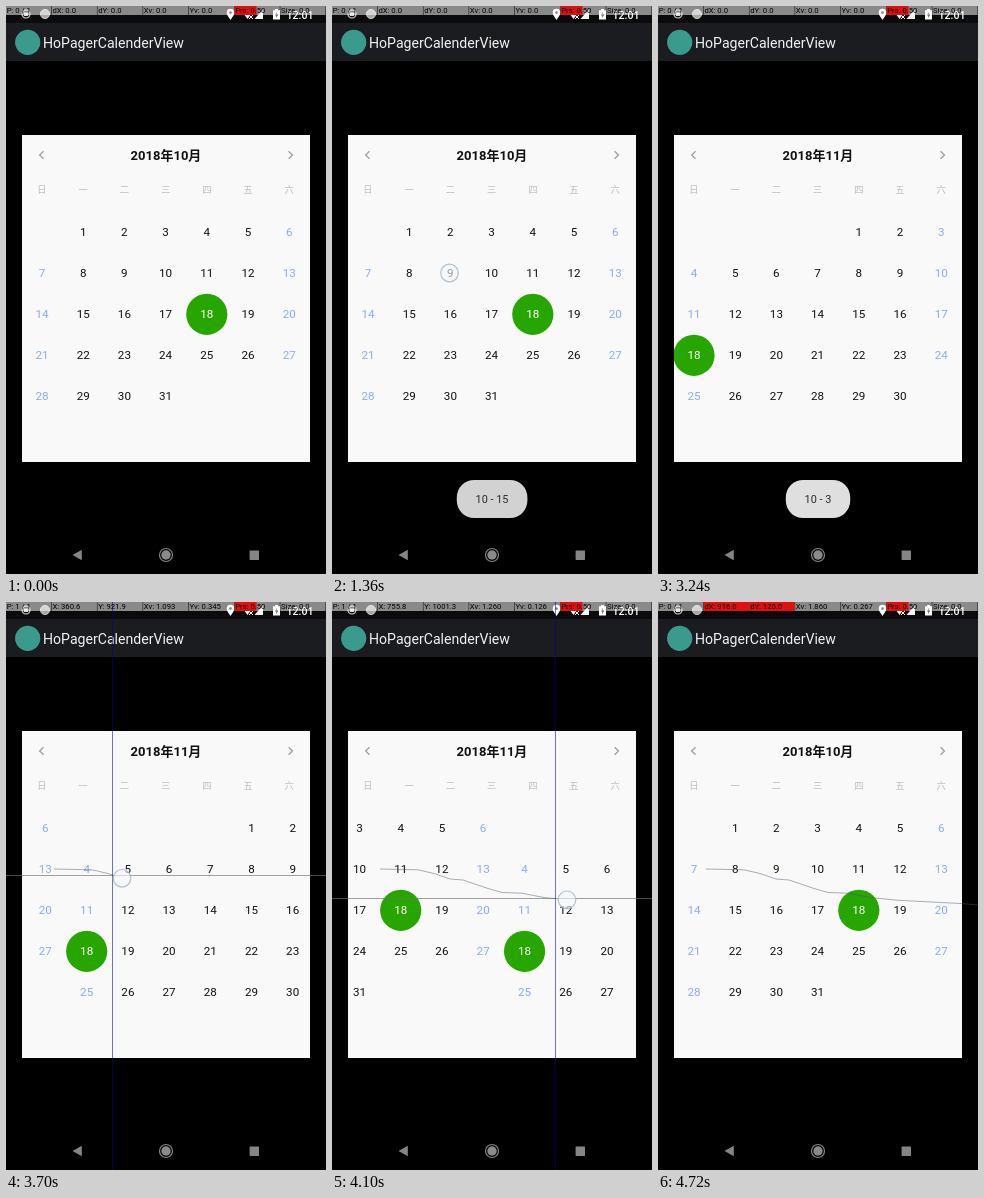
An HTML page that plays this animation: 320x568 px, repeating every 4.8 s.

```html
<!DOCTYPE html>
<html lang="en">
<head>
<meta charset="utf-8">
<title>Calendar pager</title>
<style>
html, body { margin: 0; width: 100%; height: 100%; overflow: hidden; background: #000; }
svg { display: block; width: 100vw; height: 100vh; }
text { font-family: Roboto, "Noto Sans CJK SC", "Noto Sans CJK JP", "Noto Sans CJK", sans-serif; white-space: pre; }
</style>
</head>
<body>
<svg id="stage" viewBox="0 0 320 568" xmlns="http://www.w3.org/2000/svg"></svg>
<script>
const LOOP = 4800, CELL = 41.2, ROW = 41, PAGE = 288.6, DENSITY = 3.375, ITEM = 320 / 7;
const stage = document.getElementById('stage');

function add(parent, tag, attrs, content) {
  const el = document.createElementNS('http://www.w3.org/2000/svg', tag);
  set(el, attrs);
  if (content !== undefined) el.textContent = content;
  parent.appendChild(el);
  return el;
}
function set(el, attrs) {
  for (const k in attrs) el.setAttribute(k, attrs[k]);
}
const rect = (p, x, y, width, height, fill, more) => add(p, 'rect', { x, y, width, height, fill, ...more });
const circle = (p, cx, cy, r, fill, more) => add(p, 'circle', { cx, cy, r, fill, ...more });
const path = (p, d, more) => add(p, 'path', { d, fill: 'none', ...more });
const label = (p, x, y, size, fill, str, more) =>
  add(p, 'text', { x, y, 'font-size': size, fill, 'text-anchor': 'middle', ...more }, str);
const show = (el, opacity) => el.setAttribute('opacity', opacity);
const ramp = (t, a, b) => Math.min(1, Math.max(0, (t - a) / (b - a)));
const quint = u => 1 - Math.pow(1 - u, 5);

// Bars
rect(stage, 0, 0, 320, 568, '#000');
rect(stage, 0, 0, 320, 17, '#0b0b0d');
rect(stage, 0, 17, 320, 38, '#1b1c1f');
circle(stage, 21.7, 36.3, 12.6, '#3a9b8c');
label(stage, 37, 42, 14.1, '#f2f2f2', 'HoPagerCalenderView', { 'text-anchor': 'start' });

// Calendar card
const clip = add(add(stage, 'defs', {}), 'clipPath', { id: 'card' });
rect(clip, 16, 129, 288, 327, '#fff');
rect(stage, 16, 129, 288, 327, '#f9f9f9');
const title = label(stage, 160, 153.8, 13, '#111', '', { 'font-weight': 700 });
const chevron = { stroke: '#a2a2a2', 'stroke-width': 1.4 };
path(stage, 'M37.5 145.3L33.7 149L37.5 152.7', chevron);
path(stage, 'M282.6 145.3L286.4 149L282.6 152.7', chevron);
[...'日一二三四五六'].forEach((c, i) => label(stage, 36 + i * CELL, 186.8, 9.3, '#bdbdbd', c));

const view = add(stage, 'g', { 'clip-path': 'url(#card)' });
function month(first, days) {
  const g = add(view, 'g', {});
  for (let d = 1; d <= days; d++) {
    const n = first + d - 1, col = n % 7;
    const x = 36 + col * CELL, y = 226 + Math.floor(n / 7) * ROW;
    if (d === 18) circle(g, x, y + 0.3, 20.6, '#27a600');
    const color = d === 18 ? '#fff' : col % 6 ? '#111' : '#8aadee';
    label(g, x, y + 4.2, 11.67, color, d);
  }
  return g;
}
const october = month(1, 31), november = month(4, 30);

// Toast
const toast = add(stage, 'g', {});
const pill = (x, w, fill) => rect(toast, x, 474, w, 38, fill, { rx: 17.3 });
const wide = pill(124.8, 70.6, '#d2d2d2');
const narrow = pill(127.8, 64.4, '#dfdfdf');
const notes = [15, 9, 3].map(d => label(toast, 160, 497, 10.9, '#2b2b2b', '10 - ' + d));

// Navigation bar
path(stage, 'M66.5 549L75.8 543.7V554.3Z', { fill: '#858585' });
circle(stage, 160, 549, 6.5, 'none', { stroke: '#858585', 'stroke-width': 1.2 });
circle(stage, 160, 549, 4.7, '#8a8a8a');
rect(stage, 243.6, 544.5, 9.4, 9.4, '#858585', { rx: 0.6 });

// Status icons
circle(stage, 20, 8, 4, 'none', { stroke: '#d8d8d8', 'stroke-width': 1.2 });
rect(stage, 17.8, 6.5, 4.4, 3.5, '#d8d8d8');
circle(stage, 39, 8, 4.6, '#a8a8a8', { stroke: '#d0d0d0', 'stroke-width': 0.9 });
path(stage, 'M224.5 14C222 10.5 220.7 8.7 220.7 6.6A3.8 3.8 0 0 1 228.3 6.6C228.3 8.7 227 10.5 224.5 14ZM224.5 5.2A1.4 1.4 0 1 0 224.5 8A1.4 1.4 0 1 0 224.5 5.2Z', { fill: '#fff', 'fill-rule': 'evenodd' });
path(stage, 'M236 5.5Q241.5 1.5 247 5.5L241.5 13Z', { fill: '#f4f4f4' });
path(stage, 'M243 9L247 13M247 9L243 13', { stroke: '#fff', 'stroke-width': 1 });
path(stage, 'M257 3.5V13H248.5Z', { fill: '#f4f4f4' });
path(stage, 'M267 4.2H269V3H272V4.2H274V13.5H267Z', { fill: '#fff' });
path(stage, 'M271.2 5.5L269 9.2H270.6L270 12L272.3 8.3H270.7Z', { fill: '#222' });
label(stage, 294, 12.6, 10.6, '#fff', '12:01', { 'font-weight': 500 });

// Pointer overlay: a translucent strip above the icons
const header = add(stage, 'g', {});
const cells = [], bars = [];
for (let i = 0; i < 7; i++) {
  const x = i * ITEM;
  rect(header, x, 0, ITEM - 0.5, 9, '#fff', { 'fill-opacity': 0.52 });
  bars.push(rect(header, x, 0, i === 5 ? 22 : ITEM - 0.5, 9, '#e01010'));
  cells.push(label(header, x + 0.7, 7, 7.7, '#000', '', { 'text-anchor': 'start' }));
}
const trace = path(stage, '', { stroke: '#4d5870', 'stroke-width': 0.6, opacity: 0.8 });
const cross = add(stage, 'g', {});
const hLine = rect(cross, 0, 0, 320, 1, '#6d746d', { opacity: 0.65 });
const vLine = rect(cross, 0, 0, 1, 568, '#0000a0', { opacity: 0.55 });
const touch = circle(stage, 0, 0, 8.8, '#f4f7fa', {
  'fill-opacity': 0.6, stroke: '#9fb2c2', 'stroke-width': 1.2, 'stroke-opacity': 0.8
});

// Swipe
const DOWN = 3420, MID = 3920, LATE = 4280, UP = 4312;
const route = [[48, 267], [86, 267.8], [102, 271.5], [118, 277], [131, 278], [156, 286.5], [170, 290.5],
  [190, 291.2], [212, 295.5], [240, 298.3], [270, 299.8], [304, 301.6], [320, 303]];

function hermite(u, a, b) {
  return u * u * (3 - 2 * u) + a * u * (1 - u) * (1 - u) - b * u * u * (1 - u);
}
function fingerX(t) {
  if (t < DOWN) return 48;
  if (t < MID) return 48 + 122.1 * hermite((t - DOWN) / 500, 0, 0.8);
  if (t < LATE) return 170.1 + 134.1 * hermite((t - MID) / 360, 0.55, 1.36);
  return Math.min(319.4, 304.2 + (t - LATE) * 0.53);
}
function routeY(x) {
  for (let i = 1; i < route.length; i++) {
    const [x0, y0] = route[i - 1], [x1, y1] = route[i];
    if (x <= x1) return y0 + (y1 - y0) * (x - x0) / (x1 - x0);
  }
  return 303;
}
const dragOffset = t => Math.max(0, (fingerX(t) - 48) * 0.955 - 11.5);

// Taps: x, y, down, up, whether the cross lines appear
const taps = [[77, 308, 600, 690, true], [117.5, 267, 1270, 1380, false],
  [159.5, 226, 1880, 1990, false], [285, 149, 2860, 2950, true]];

function pages(t) {
  let x = 0;
  if (t < DOWN) x = PAGE * (1 - quint(ramp(t, 2970, 3170)));
  else if (t < UP) x = dragOffset(t);
  else {
    const from = dragOffset(UP);
    x = from + (PAGE - from) * quint(ramp(t, UP + 15, UP + 300));
  }
  november.setAttribute('transform', `translate(${x} 0)`);
  october.setAttribute('transform', `translate(${x - PAGE} 0)`);
  title.textContent = t >= 2970 && t < UP + 15 ? '2018年11月' : '2018年10月';
}

function message(t) {
  show(toast, ramp(t, 760, 1040) * (1 - ramp(t, 3380, 3620)));
  const nine = ramp(t, 1480, 1620), three = ramp(t, 2080, 2240);
  show(wide, t < 2860 ? 1 : 0);
  show(narrow, nine);
  show(notes[0], 1 - nine);
  show(notes[1], nine * (1 - three));
  show(notes[2], three);
}

function pointer(t) {
  const x = fingerX(t), y = routeY(x), drag = t >= DOWN && t < UP;
  const tap = taps.find(p => p[4] && t >= p[2] && t < p[3]);
  const at = drag ? [x, y] : tap;
  show(cross, at ? 1 : 0);
  if (at) {
    vLine.setAttribute('x', Math.floor(at[0]));
    hLine.setAttribute('y', Math.floor(at[1]));
  }

  let d = '';
  if (t >= DOWN) {
    d = 'M48 267';
    for (const [px, py] of route) if (px > 48 && px < x) d += `L${px} ${py}`;
    d += `L${x} ${y}`;
  }
  trace.setAttribute('d', d);

  let spot = null, alpha = 0;
  for (const p of taps) {
    if (t >= p[2] && t < p[3] + 50) {
      spot = p;
      alpha = 1 - ramp(t, p[3], p[3] + 50);
    }
  }
  if (t >= DOWN - 20 && t < UP + 30) {
    const lead = fingerX(t + 28);
    spot = [lead, routeY(lead)];
    alpha = 1 - ramp(t, UP - 10, UP + 30);
  }
  show(touch, alpha);
  if (spot) set(touch, { cx: spot[0], cy: spot[1] });

  let vx = 0, vy = 0;
  if (drag) {
    const back = fingerX(t - 20);
    vx = (x - back) / 20 * DENSITY;
    vy = (y - routeY(back)) / 20 * DENSITY;
  }
  const done = t >= UP;
  const px = v => (v * DENSITY).toFixed(1);
  const texts = [
    at ? 'P: 1 / 1' : 'P: 0 / 1',
    at ? 'X: ' + px(at[0]) : done ? 'dX: 916.0' : 'dX: 0.0',
    at ? 'Y: ' + px(at[1]) : done ? 'dY: 120.0' : 'dY: 0.0',
    'Xv: ' + (done ? '1.860' : drag ? vx.toFixed(3) : '0.0'),
    'Yv: ' + (done ? '0.267' : drag ? vy.toFixed(3) : '0.0'),
    'Prs: 0.50', 'Size: 0.0'
  ];
  texts.forEach((s, i) => {
    cells[i].textContent = s;
    show(bars[i], i === 5 || done && (i === 1 || i === 2) ? 1 : 0);
  });
}

function render(t) {
  pages(t);
  message(t);
  pointer(t);
}
const start = performance.now();
function tick() {
  render((performance.now() - start) % LOOP);
  requestAnimationFrame(tick);
}
render(0);
requestAnimationFrame(tick);
</script>
</body>
</html>
```
